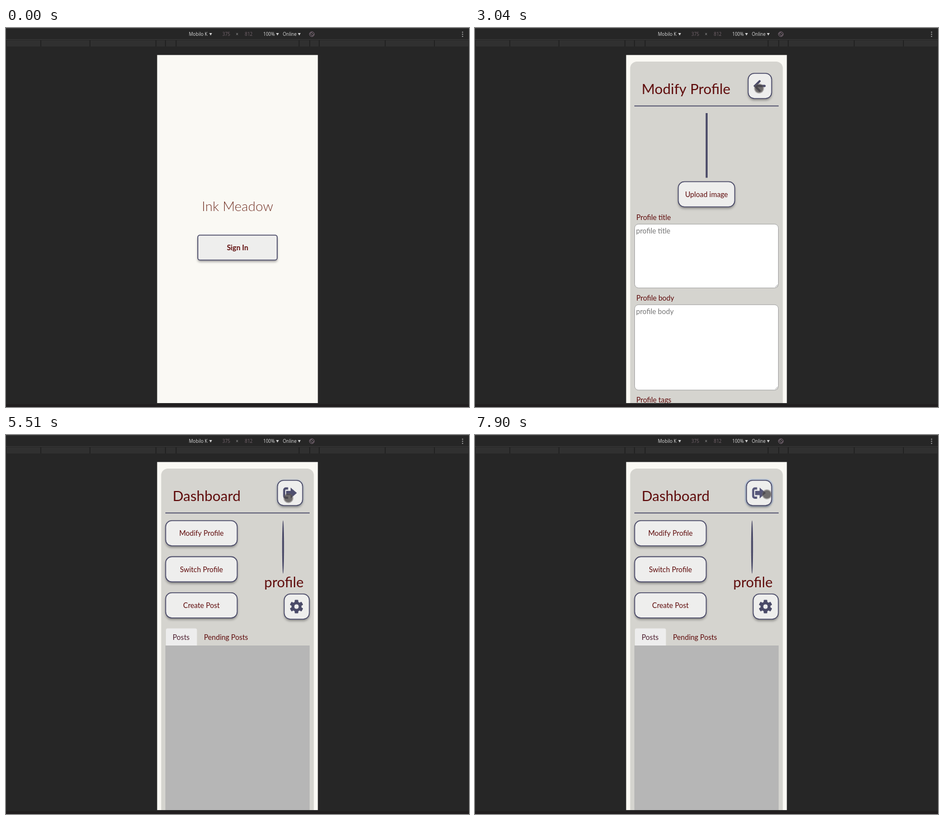
An HTML page with a canvas for the animation above (7.99 s loop, 828 px wide and 677 px high).

```html
<!DOCTYPE html>
<html lang="en">
<head>
<meta charset="utf-8">
<title>App walkthrough</title>
<style>
html, body { margin: 0; width: 100%; height: 100%; overflow: hidden; background: #262626; }
canvas { display: block; }
</style>
</head>
<body>
<canvas id="stage" width="828" height="677"></canvas>
<script>
const ctx = document.getElementById('stage').getContext('2d');
const LOOP = 7990;
const INK = '#4a4a68', MAROON = '#5f0b0b', PALE = '#ededed', GREY = '#b6b6b6', PANEL = '#d5d4cf';

const PAGES = [
  { at: 0, name: 'signin' }, { at: 970, name: 'dash' },
  { at: 2470, name: 'modify' }, { at: 3350, name: 'dash' },
  { at: 4630, name: 'switch' }, { at: 5450, name: 'dash' },
  { at: 6130, name: 'create' }, { at: 7700, name: 'dash' }
];
// each trip of the pointer: leaves, arrives, destination
const TRIPS = [
  { from: 120, to: 770, x: 436, y: 393 },
  { from: 1150, to: 2110, x: 347, y: 178 },
  { from: 2450, to: 3040, x: 508, y: 108 },
  { from: 3640, to: 4270, x: 368, y: 247 },
  { from: 4530, to: 4810, x: 480, y: 165 },
  { from: 4830, to: 5190, x: 508, y: 108 },
  { from: 5470, to: 5930, x: 377, y: 320 },
  { from: 6220, to: 6820, x: 522, y: 106 }
];

const clamp = v => Math.max(0, Math.min(1, v));
const smooth = v => v * v * (3 - 2 * v);

function text(s, x, y, size, color = MAROON, align = 'left', weight = 400, family = 'Lato') {
  ctx.font = `${weight} ${size}px ${family}, sans-serif`;
  ctx.fillStyle = color;
  ctx.textAlign = align;
  ctx.fillText(s, x, y + size * 0.36);
}

function rect(x, y, w, h, color) {
  ctx.fillStyle = color;
  ctx.fillRect(x, y, w, h);
}

function paint(fill, stroke, width) {
  if (fill) { ctx.fillStyle = fill; ctx.fill(); }
  if (stroke) { ctx.strokeStyle = stroke; ctx.lineWidth = width; ctx.stroke(); }
}

function round(x, y, w, h, r, fill, stroke, width = 1.6) {
  ctx.beginPath();
  ctx.roundRect(x, y, w, h, r);
  paint(fill, stroke, width);
}

function oval(x, y, rx, ry, fill, stroke, width = 1.6) {
  ctx.beginPath();
  ctx.ellipse(x, y, rx, ry, 0, 0, Math.PI * 2);
  paint(fill, stroke, width);
}

function triangle(x, y, w, h, color) {
  ctx.beginPath();
  ctx.moveTo(x, y);
  if (w) { ctx.lineTo(x + w, y); ctx.lineTo(x + w / 2, y + h); }
  else { ctx.lineTo(x, y + h); ctx.lineTo(x + h * .58, y + h / 2); }
  paint(color);
}

function button(x, y, w, h, label, r = 11, weight = 400) {
  ctx.save();
  ctx.shadowColor = 'rgba(0,0,0,.38)';
  ctx.shadowBlur = 4;
  ctx.shadowOffsetY = 3;
  round(x, y, w, h, r, '#eeeeed');
  ctx.restore();
  round(x, y, w, h, r, null, INK);
  if (label) text(label, x + w / 2, y + h / 2, 12.8, MAROON, 'center', weight);
}

// header button with its right edge fixed, glowing while focused
function cornerButton(w, glow) {
  const x = 530.5 - w;
  ctx.globalAlpha = glow;
  round(x - 1, 80.5, w + 2, 46, 12, null, '#9db6dc', 4.5);
  ctx.globalAlpha = 1;
  button(x, 81, w, 45);
}

function iconColor(glow) {
  const mix = (a, b) => Math.round(a + (b - a) * glow);
  return `rgb(${mix(74, 102)},${mix(74, 102)},${mix(104, 142)})`;
}

function exitIcon(color) {
  ctx.save();
  ctx.beginPath();
  ctx.rect(494, 92, 10.5, 24);
  ctx.clip();
  round(497.5, 95.5, 20, 16.5, 3, null, color, 3.8);
  ctx.restore();
  rect(501, 99.8, 9, 7.6, color);
  triangle(509, 94, 0, 19.2, color);
}

function backIcon(color) {
  ctx.lineCap = 'round';
  ctx.beginPath();
  ctx.moveTo(509, 95);
  ctx.lineTo(500.5, 103.5);
  ctx.lineTo(509, 112);
  ctx.moveTo(501, 103.5);
  ctx.lineTo(518, 103.5);
  paint(null, color, 3.8);
  ctx.lineCap = 'butt';
}

function gearIcon(x, y) {
  ctx.save();
  ctx.translate(x, y);
  for (let i = 0; i < 6; i++) {
    round(-3.2, -12, 6.4, 8, 1.2, INK);
    ctx.rotate(Math.PI / 3);
  }
  oval(0, 0, 9, 9, INK);
  oval(0, 0, 3.9, 3.9, '#eeeeed');
  ctx.restore();
}

function trashIcon() {
  const red = '#f20d0d';
  round(493.5, 173.5, 16, 2.6, 1, red);
  round(498.5, 171.8, 6, 2.5, 1, red);
  round(495, 177.2, 13, 14, 1.8, red);
  for (let i = 0; i < 3; i++) rect(497.6 + i * 3.3, 179.5, 1.2, 9, '#fff');
}

function frame() {
  rect(0, 0, 828, 677, '#262626');
  rect(0, 0, 828, 1, '#3b3b3b');
  rect(0, 20, 828, 1, '#3a3a3a');
  rect(0, 22, 828, 11, '#303030');
  for (const d of [110, 129, 146, 264, 352, 414]) {
    rect(413.5 - d, 22, 1.5, 11, '#1f1f1f');
    rect(413.5 + d, 22, 1.5, 11, '#1f1f1f');
  }
  rect(0, 672, 828, 5, '#211e1f');
  const label = (s, x, color = '#dcdcdc') => text(s, x, 11.5, 8.1, color, 'left', 400, '"Open Sans"');
  label('Mobilo K', 327);
  label('100%', 460);
  label('Online', 495);
  label('375', 387, '#75656d');
  label('×', 411, '#a0a0a0');
  label('812', 427, '#75656d');
  for (const x of [366, 485.5, 524.5]) triangle(x - 2.5, 9, 5, 4.5, '#d4d4d4');
  oval(547, 11, 4.3, 4.3, null, '#806b7b', 1);
  ctx.save();
  ctx.translate(547, 11);
  ctx.rotate(-Math.PI / 4);
  round(-1.6, -3, 3.2, 6, .5, '#262626', '#9a8594', .9);
  ctx.restore();
  for (let i = -1; i < 2; i++) oval(816.5, 11.2 + i * 3.7, 1, 1, '#b5b5b5');
}

function header(title) {
  text(title, 298, 108.5, 25.5);
  rect(285, 138.5, 258, 1.6, INK);
}

function portrait(loaded) {
  if (!loaded) return oval(495.5, 200, 1.7, 47.5, INK);
  ctx.save();
  oval(496, 200, 48.7, 47, PALE);
  ctx.clip();
  oval(496, 245, 26, 26, INK);
  oval(496, 200.5, 23.5, 23.5, INK);
  ctx.restore();
  oval(496, 200, 48.7, 47, null, INK);
}

function tree() {
  const green = '#22ad4c';
  ctx.lineJoin = 'round';
  for (let i = 0; i < 3; i++) {
    const top = 402 + i * 17, half = 15 + i * 6.5;
    ctx.beginPath();
    ctx.moveTo(349 - i * 5, top);
    ctx.lineTo(360 + i * 5, top);
    ctx.lineTo(355 + half, top + 15);
    ctx.lineTo(355 - half, top + 15);
    ctx.closePath();
    paint(green, green, 9);
  }
  rect(344, 454, 20, 18, green);
  const colors = ['#e02b35', '#3f48cc', '#c8bfe7', '#b5d13c', '#b97a57'];
  for (let row = 0; row < 4; row++) {
    const count = 4 + row;
    for (let i = 0; i < count; i++) {
      const u = i / (count - 1);
      oval(346 - row * 3 + u * (20 + row * 7), 409 + row * 11.5 + u * 9, 2.6, 2.3, colors[(i * 2 + row) % 5]);
    }
  }
}

// two eyes and a curved brush stroke
function face(color, eyes, start, bend, end) {
  eyes.forEach(([x, y, r]) => oval(x, y, 8.5, r, color));
  ctx.lineCap = 'round';
  ctx.beginPath();
  ctx.moveTo(...start);
  ctx.quadraticCurveTo(...bend, ...end);
  paint(null, color, 8.5);
  ctx.lineCap = 'butt';
}

const smile = () => face('#ec1c24', [[328, 523, 5.5], [369, 518, 6]], [327, 557], [364, 577], [375, 541]);
const frown = () => face('#3f48cc', [[338, 630.5, 9], [376, 645, 9]], [317, 666], [340, 646], [366, 674]);

const POSTS = [
  { lines: ['Merry Christm...', 'XMAS', '#tree'], draw: tree },
  { lines: ['Doing some ...', "And then we'v...", '#blessed'], draw: smile },
  { lines: ['A Masterpiece', 'Like forreal ju...', ''], draw: frown }
];

function posts(images) {
  POSTS.forEach(({ lines, draw }, i) => {
    const y = 396.5 + i * 108.7;
    ctx.save();
    ctx.beginPath();
    ctx.rect(316.5, y, 75, 75);
    paint(images ? '#fff' : PALE);
    ctx.clip();
    if (images) {
      ctx.filter = 'blur(0.8px)';
      draw();
    }
    ctx.restore();
    round(316.5, y, 75, 75, 0, null, INK);
    lines.forEach((s, j) => {
      const top = y - .5 + j * 26.8;
      round(401, top, 105, 23, 11.5, PALE);
      text(s, 409, top + 11.8, 12.5, s[0] === '#' ? '#1a80e0' : '#7a2828');
    });
    rect(296, y + 87.5, 235, 1.6, INK);
  });
}

function dashboard(age, first, glow) {
  const icons = !first || age > 260;
  const filled = age > (first ? 300 : 230);
  const width = icons ? 45 : 39;
  header('Dashboard');
  cornerButton(width, glow);
  button(542.5 - width, 284, width, 45);
  if (icons) {
    exitIcon(iconColor(glow));
    gearIcon(519.5, 306.5);
  }
  ['Modify Profile', 'Switch Profile', 'Create Post'].forEach((s, i) =>
    button(285.5, 153 + i * 64.4, 128, 45, s));
  portrait(filled);
  text('profile', 497, 263, 25.2, MAROON, 'center');
  round(286, 345.5, 55.5, 31, [3, 3, 0, 0], PALE);
  text('Posts', 298, 361, 12.8, '#4a1c2c');
  text('Pending Posts', 354, 361, 12.8);
  rect(285, 376, 258, 294, GREY);
  if (!filled) return;
  posts(age > 450);
  ctx.globalAlpha = clamp((560 - age) / 120);
  round(537.5, 378, 3, 277, 1.5, '#979797');
  ctx.globalAlpha = 1;
}

function subpage(title, glow) {
  header(title);
  cornerButton(42, glow);
  backIcon(iconColor(glow));
}

function field(label, y, h) {
  text(label, 288.5, y, 12.8);
  const top = y + 12.3, bottom = top + h;
  round(285.5, top, 257, h, 7, '#fff', '#9c9c9c', .9);
  text(label.toLowerCase(), 288, top + 12, 12.8, '#757575');
  ctx.beginPath();
  for (const d of [2, 5]) {
    ctx.moveTo(542 - d, bottom - 1.5);
    ctx.lineTo(541.5, bottom - d - 1);
  }
  paint(null, '#888', .8);
}

function form(title, kind, glow) {
  subpage(title, glow);
  rect(412.5, 152, 3.5, 115.5, INK);
  button(363.5, 274.5, 101, 45, 'Upload image');
  field(kind + ' title', 338, 114);
  field(kind + ' body', 482, 152.5);
  field(kind + ' tags', 664, 114);
}

function switchPage(age, glow) {
  subpage('Switch Profile', glow);
  rect(285, 152.5, 258, 398, GREY);
  if (age > 80) {
    round(340.5, 166, 117, 31, 7, '#fff', '#cfcfcf', .8);
    text('willow-test', 399, 181.8, 12.4, MAROON, 'center');
    round(487.5, 166, 29, 31, 7, '#fff', '#cfcfcf', .8);
    trashIcon();
  }
  button(365.5, 557.5, 97, 45, 'Create Profile');
}

function signIn() {
  text('Ink Meadow', 414, 318.5, 24, '#75352a', 'center', 300);
  button(343, 370, 142, 44.5, 'Sign In', 4, 700);
}

function pointer(t) {
  let x = 690, y = 692;
  for (const trip of TRIPS) {
    const k = smooth(clamp((t - trip.from) / (trip.to - trip.from)));
    x += (trip.x - x) * k;
    y += (trip.y - y) * k;
  }
  // a click comes shortly before each page change
  const clicked = PAGES.some(p => p.at - t <= 200 && p.at - t > 100);
  if (clicked) return oval(x, y, 8.8, 8.8, 'rgba(190,182,20,.72)');
  oval(x, y, 9, 9, 'rgba(105,100,100,.5)');
  oval(x, y, 7.3, 7.3, 'rgba(62,58,58,.55)');
}

function render(t) {
  const index = PAGES.findLastIndex(p => p.at <= t);
  const { at, name } = PAGES[index];
  const age = t - at;
  // focus fades in after going back and fades out on the next page
  let glow = 0;
  if (index > 2) glow = clamp(name === 'dash' ? age / 400 : 1 - age / 180);
  frame();
  ctx.save();
  ctx.beginPath();
  ctx.rect(270.3, 48.2, 287.4, 621.8);
  ctx.clip();
  rect(270, 48, 288, 622, '#faf9f4');
  if (name !== 'signin') round(277.5, 60, 273, name === 'switch' ? 554 : 640, 12, PANEL);
  if (name === 'signin') signIn();
  if (name === 'dash') dashboard(age, index === 1, glow);
  if (name === 'modify') form('Modify Profile', 'Profile', glow);
  if (name === 'create') form('Create Post', 'Post', glow);
  if (name === 'switch') switchPage(age, glow);
  ctx.restore();
  pointer(t);
}

const begin = performance.now();
function tick() {
  render((performance.now() - begin) % LOOP);
  requestAnimationFrame(tick);
}
tick();
</script>
</body>
</html>
```
